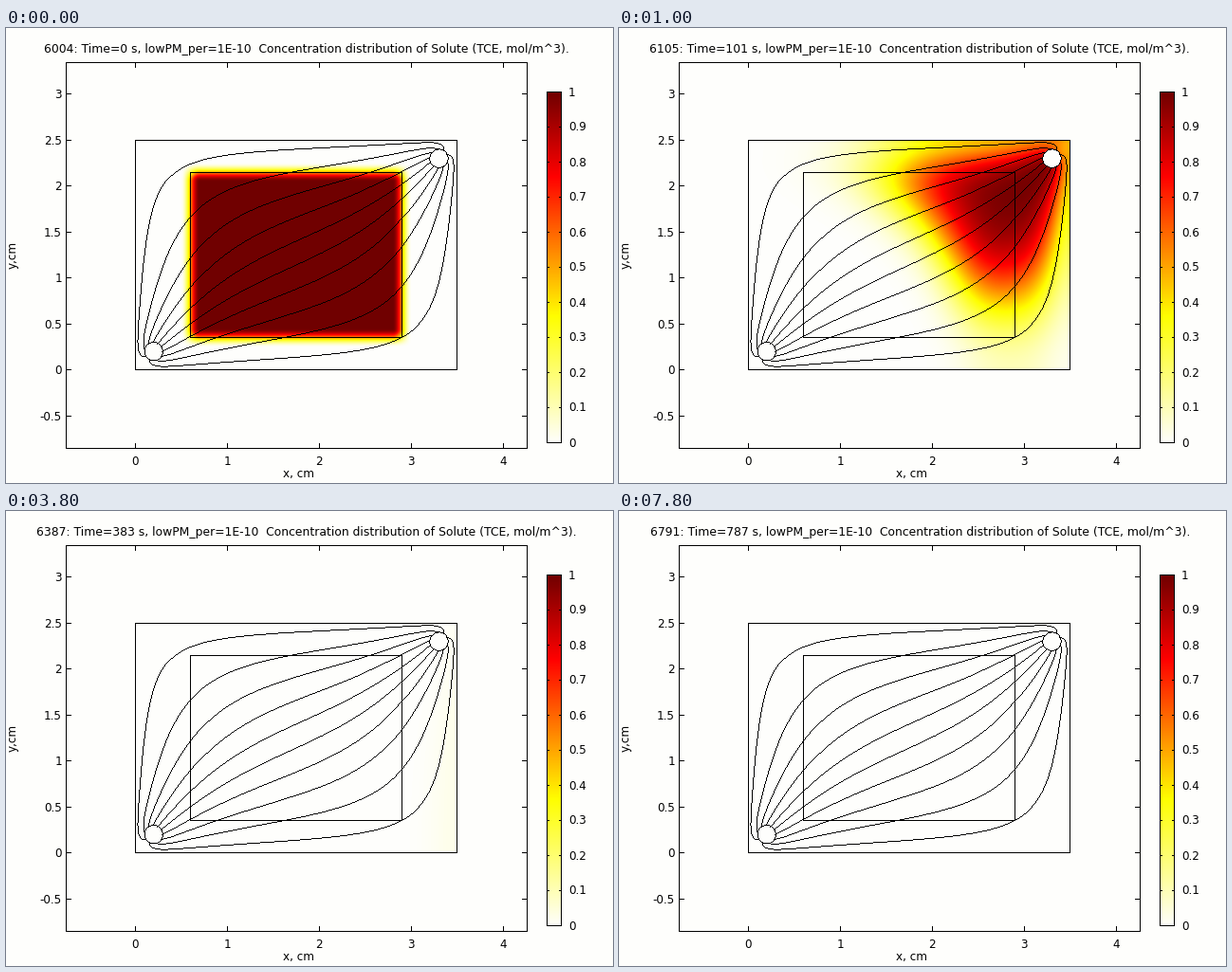
A matplotlib script that plays this animation: 640x480 px, repeating every 8000 ms.

```python
import numpy as np
import matplotlib.pyplot as plt
from matplotlib.animation import FuncAnimation
from matplotlib.colors import LinearSegmentedColormap
from matplotlib.patches import Circle, Rectangle

FRAMES, INTERVAL = 40, 200
STEP_TIME = 20.2            # simulated seconds per frame
SUBSTEPS = 8
WIDTH, HEIGHT = 3.5, 2.5    # domain, cm
H = 0.02                    # grid spacing, cm
FLOW = 0.036                # cm^2/s per unit depth
DIFFUSION = 4.4e-4          # cm^2/s
WELL_R = 0.1
INLET, OUTLET = 0.2 + 0.2j, 3.3 + 2.3j
# Flow centres sit slightly off the wells so each rim has an even flux.
SOURCE, SINK = 0.168 + 0.168j, 3.332 + 2.332j
BOX = (0.6, 0.35, 2.9, 2.15)
PAPER = "#fefefc"


def velocity(z):
    """Source-sink flow in a closed rectangle by the method of images."""
    total = 0
    for centre, sign in ((SOURCE, 1), (SINK, -1)):
        for n in range(-2, 3):
            for sx in (-1, 1):
                for sy in (-1, 1):
                    image = sx * centre.real + 1j * (sy * centre.imag + 2 * HEIGHT * n)
                    total = total + sign / np.tan(np.pi * (z - image) / (2 * WIDTH))
    return np.conj(total) * FLOW / (4 * WIDTH)


def in_well(z):
    return (abs(z - INLET) < WELL_R) | (abs(z - OUTLET) < WELL_R)


def trace(z, step, count=650):
    path = [z]
    for _ in range(count):
        v = velocity(z)
        mid = velocity(z + 0.5 * step * v / abs(v))
        z = np.where(in_well(z), z, z + step * mid / abs(mid))
        path.append(z)
    return np.array(path)


def streamlines():
    y = np.linspace(HEIGHT, 0, 1001)
    u = velocity(WIDTH / 2 + 1j * y).real
    flux = np.concatenate(([0], np.cumsum(u[1:] + u[:-1])))
    seeds = np.interp(0.042 + 0.1 * np.arange(10), flux / flux[-1], y)
    z = WIDTH / 2 + 1j * seeds
    return np.concatenate((trace(z, -0.01)[::-1], trace(z, 0.01)[1:])).T


def heat_kernel(x, sigma):
    """Gaussian spreading along one axis with reflecting ends."""
    a, b, end = x[:, None], x[None, :], x[-1]
    k = sum(np.exp(-((a - m) / sigma) ** 2 / 2) for m in (b, -b, 2 * end - b))
    k[:, [0, -1]] *= 0.5
    return k / k.sum(axis=1, keepdims=True)


def plateau(x, lo, hi, half=0.1):
    def rise(d):
        t = np.clip((d + half) / (2 * half), 0, 1)
        return t * t * (3 - 2 * t)
    return rise(x - lo) * rise(hi - x)


def concentration():
    x = np.linspace(0, WIDTH, round(WIDTH / H) + 1)
    y = np.linspace(0, HEIGHT, round(HEIGHT / H) + 1)
    dt = STEP_TIME / SUBSTEPS

    # Where the fluid at each node was one time step earlier.
    z = x[None, :] + 1j * y[:, None]
    parts = 10
    for _ in range(parts):
        v = velocity(z)
        v = v / np.maximum(1, abs(v) / 0.12)
        moved = z - v * dt / parts
        moved = np.clip(moved.real, 0, WIDTH) + 1j * np.clip(moved.imag, 0, HEIGHT)
        z = np.where(abs(z - INLET) < WELL_R, z, moved)
    clean = abs(z - INLET) < WELL_R
    gx, gy = z.real / H, z.imag / H
    i = np.clip(gx.astype(int), 0, len(x) - 2)
    j = np.clip(gy.astype(int), 0, len(y) - 2)
    fx, fy = gx - i, gy - j

    sigma = np.sqrt(2 * DIFFUSION * dt)
    kx, ky = heat_kernel(x, sigma).T, heat_kernel(y, sigma)
    c = plateau(y, BOX[1], BOX[3])[:, None] * plateau(x, BOX[0], BOX[2])[None, :]
    fields = [c]
    for _ in range(FRAMES - 1):
        for _ in range(SUBSTEPS):
            low = c[j, i] * (1 - fx) + c[j, i + 1] * fx
            high = c[j + 1, i] * (1 - fx) + c[j + 1, i + 1] * fx
            c = np.where(clean, 0, low * (1 - fy) + high * fy)
            c = ky @ c @ kx
        fields.append(c)
    return fields


def px(x):
    return 136.3 + 97 * x


def py(y):
    return 360.7 - 97 * y


fig = plt.figure(figsize=(8, 6), dpi=80, facecolor=PAPER)
PT = 72 / 80                # points per pixel
plt.rcParams["font.family"] = "DejaVu Sans"
ax = fig.add_axes([0, 0, 1, 1])
ax.axis("off")
ink = np.zeros((480, 640, 4))   # black hairlines, one pixel wide


def stroke(xs, ys):
    """Draw a crisp one-pixel polyline."""
    xs, ys = np.asarray(xs, float), np.asarray(ys, float)
    steps = np.maximum(abs(np.diff(xs)), abs(np.diff(ys)))
    run = np.concatenate(([0], np.cumsum(steps)))
    s = np.linspace(0, run[-1], int(np.ceil(run[-1])) + 1)
    cols = np.floor(np.interp(s, run, xs)).astype(int)
    rows = np.floor(np.interp(s, run, ys)).astype(int)
    ink[rows, cols, 3] = 1


def frame(x0, y0, x1, y1):
    stroke([x0, x1, x1, x0, x0], [y0, y0, y1, y1, y0])


def label(x, y, text, size=12, **kw):
    return ax.text(x, y, text, fontsize=size * PT, color="black", zorder=4, **kw)


hot = LinearSegmentedColormap.from_list("heat", [
    (0, PAPER), (0.36, (1, 1, 0)), (0.76, (1, 0, 0)), (1, (0.44, 0, 0))], N=512)
shade = dict(cmap=hot, vmin=0, vmax=1, origin="lower", aspect="auto",
             interpolation="bilinear", interpolation_stage="data", zorder=1)

# Concentration field and geometry
fields = concentration()
image = ax.imshow(fields[0], extent=(px(-H / 2), px(WIDTH + H / 2),
                                     py(-H / 2), py(HEIGHT + H / 2)), **shade)
image.set_clip_path(Rectangle((px(0), py(HEIGHT)), 97 * WIDTH, 97 * HEIGHT,
                              transform=ax.transData))
frame(px(0), py(0), px(WIDTH), py(HEIGHT))
frame(px(BOX[0]), py(BOX[1]), px(BOX[2]), py(BOX[3]))
for path in streamlines():
    stroke(px(path.real), py(path.imag))
rim = WELL_R * np.exp(1j * np.linspace(0, 2 * np.pi, 121))
for well in (INLET, OUTLET):
    ax.add_patch(Circle((px(well.real), py(well.imag)), 97 * WELL_R,
                        fc=PAPER, ec="none", zorder=2))
    stroke(px((well + rim).real), py((well + rim).imag))

# Axes
LEFT, TOP, RIGHT, BOTTOM = 63, 36, 549, 443
frame(LEFT, TOP, RIGHT, BOTTOM)
for v in range(5):
    x = px(v)
    stroke([x, x], [TOP, TOP + 5])
    stroke([x, x], [BOTTOM - 5, BOTTOM])
    label(x, 461, str(v), ha="center")
for v in np.arange(-0.5, 3.1, 0.5):
    y = py(v)
    stroke([LEFT, LEFT + 5], [y, y])
    stroke([RIGHT - 5, RIGHT], [y, y])
    label(59, y + 4.5, f"{v:g}", ha="right")
label(308, 474, "x, cm", ha="center")
label(7.5, 239, "y,cm", ha="center", va="center", rotation=90)

# Colour bar
BAR_L, BAR_T, BAR_R, BAR_B = 570, 67, 585, 437
ax.imshow(np.linspace(0, 1, 370)[:, None],
          extent=(BAR_L, BAR_R + 1, BAR_B + 1, BAR_T), **shade)
frame(BAR_L, BAR_T, BAR_R, BAR_B)
for k in range(11):
    y = BAR_B + (BAR_T - BAR_B) * k / 10
    stroke([BAR_L, BAR_L + 2], [y, y])
    stroke([BAR_R - 2, BAR_R], [y, y])
    label(593, y + 4.5, f"{k / 10:g}", ha="left")

ax.imshow(ink, extent=(0, 640, 480, 0), aspect="auto",
          interpolation="nearest", zorder=3)
title = label(317.3, 26, "", size=12.4, ha="center")
ax.set_xlim(0, 640)
ax.set_ylim(480, 0)


def update(k):
    seconds = int(STEP_TIME * k + 1e-6)
    image.set_data(fields[k])
    title.set_text(f"{6004 + seconds}: Time={seconds} s, lowPM_per=1E-10  "
                   "Concentration distribution of Solute (TCE, mol/m^3).")
    return image, title


anim = FuncAnimation(fig, update, frames=FRAMES, interval=INTERVAL,
                     init_func=lambda: update(0), repeat=True, repeat_delay=0)
plt.show()
```
